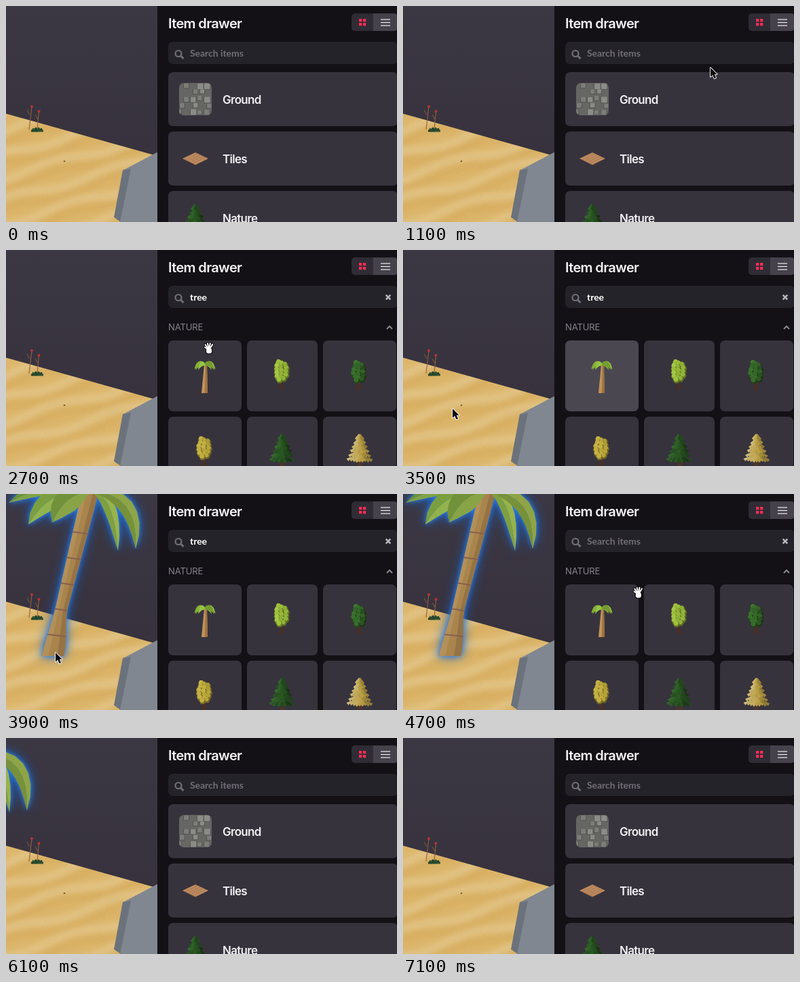
Animation, 576 px wide and 320 px high, one loop 7200 ms. Source, as an HTML page with a canvas:

```html
<!DOCTYPE html>
<html lang="en">
<head>
<meta charset="utf-8">
<title>Item drawer</title>
<style>
  html, body { margin: 0; width: 100%; height: 100%; overflow: hidden; background: #131116; }
  canvas { display: block; width: 576px; height: 320px; }
</style>
</head>
<body>
<canvas id="stage" width="576" height="320"></canvas>
<script>
const W = 576, H = 320, LOOP = 7200, STEP = 100;
const ctx = document.getElementById('stage').getContext('2d');
const UI = 'Inter, "Liberation Sans", sans-serif';
const FIELD = 'Lato, "Open Sans", sans-serif';

const clamp = p => Math.min(1, Math.max(0, p));
const smooth = p => p * p * (3 - 2 * p);
const easeOut = p => 1 - (1 - p) ** 2;

function layer(w, h, draw) {
  const c = document.createElement('canvas');
  c.width = w;
  c.height = h;
  draw(c.getContext('2d'));
  return c;
}

function rng(seed) {
  return () => (seed = (seed * 16807) % 2147483647) / 2147483647;
}

function shape(pts) {
  const p = new Path2D();
  for (let i = 0; i < pts.length; i += 2) p.lineTo(pts[i], pts[i + 1]);
  p.closePath();
  return p;
}

function poly(g, color, ...pts) {
  g.fillStyle = color;
  g.fill(shape(pts));
}

function hexagon(g, color, x, y, r) {
  const pts = [];
  for (let a = 0; a < 6; a++) pts.push(x + r * Math.cos(a * Math.PI / 3), y + r * Math.sin(a * Math.PI / 3));
  poly(g, color, ...pts);
}

function line(g, color, width, ...pts) {
  g.strokeStyle = color;
  g.lineWidth = width;
  g.beginPath();
  for (let i = 0; i < pts.length; i += 2) g.lineTo(pts[i], pts[i + 1]);
  g.stroke();
}

function box(g, color, x, y, w, h, r = 0) {
  g.fillStyle = color;
  g.beginPath();
  g.roundRect(x, y, w, h, r);
  g.fill();
}

function dot(g, color, x, y, r) {
  g.fillStyle = color;
  g.beginPath();
  g.arc(x, y, r, 0, 7);
  g.fill();
}

function text(g, str, x, y, font, color, spacing = 0) {
  g.font = font;
  g.letterSpacing = spacing + 'px';
  g.fillStyle = color;
  g.fillText(str, x, y);
}

// Scene

function drawSand(g) {
  g.save();
  g.clip(shape([0, 159.5, 224, 222.5, 224, H, 0, H]));
  box(g, '#dcb66b', 0, 150, 224, 170);
  g.filter = 'blur(5px)';
  for (let y = 185; y < 400; y += 34) {
    for (const [dy, color] of [[0, 'rgba(232,210,160,.55)'], [15, 'rgba(208,160,78,.35)']]) {
      const wave = [];
      for (let x = -10; x < 240; x += 10) wave.push(x, y + dy - x * .28 + 5 * Math.sin(x / 24 + y));
      line(g, color, 11, ...wave);
    }
  }
  g.filter = 'none';
  const rand = rng(71);
  for (let i = 0; i < 100; i++) {
    box(g, 'rgba(245,230,195,.3)', rand() * 223, 165 + rand() * 155, 1, 1);
  }
  g.restore();
}

function drawFlower(g, x, top, base, lean) {
  line(g, '#95603c', 1.1, x, base, x + lean, top);
  line(g, '#95603c', .9, x + 1, top + 12, x - 3, top + 5);
  dot(g, '#ba3433', x + lean, top, 2);
}

const scene = layer(224, H, g => {
  const sky = g.createLinearGradient(0, 0, 0, 210);
  sky.addColorStop(0, '#3c3843');
  sky.addColorStop(1, '#37323e');
  g.fillStyle = sky;
  g.fillRect(0, 0, 224, H);
  drawSand(g);
  drawFlower(g, 34, 149, 183, 4);
  drawFlower(g, 46, 156, 183, 2.5);
  for (let i = 0; i < 6; i++) {
    const a = Math.PI + i * Math.PI / 5;
    line(g, i % 2 ? '#2d5130' : '#1f3f2a', 3, 46, 185, 46 + 9 * Math.cos(a), 185 + 5 * Math.sin(a));
  }
  dot(g, '#786744', 86, 230, 1.3);
  poly(g, '#6b727c', 172, 243, 185, 240, 169, H, 159, 313);
  poly(g, '#808790', 184, 241, 172, 243.5, 224, 216, 224, H, 168, H);
});

// Palm in the scene; PAD keeps room for the glow and the crown above the stage

const PAD = 60, CROWN = [125, -4];

// A frond bends from the crown over a control point to its tip
function frond(cx, cy, tx, ty, width) {
  const upper = [], lower = [], rib = [];
  const [x0, y0] = CROWN;
  for (let i = 0; i <= 8; i++) {
    const u = i / 8, v = 1 - u;
    const x = v * v * x0 + 2 * u * v * cx + u * u * tx;
    const y = v * v * y0 + 2 * u * v * cy + u * u * ty;
    const dx = v * (cx - x0) + u * (tx - cx), dy = v * (cy - y0) + u * (ty - cy);
    const k = width * Math.sin(Math.PI * u) ** .8 / Math.hypot(dx, dy);
    rib.push([x, y]);
    upper.push([x + dy * k, y - dx * k]);
    lower.push([x - dy * k, y + dx * k]);
  }
  const side = edge => shape([...edge, ...rib.reverse()].flat());
  return [side(upper), shape([...lower, ...[...rib].reverse().reverse().sort(() => 0)].flat())];
}

const FRONDS = [
  [60, -22, 4, 13, 10], [64, -10, 33, 45, 15], [86, 0, 68, 42, 18],
  [158, -4, 165, 84, 9], [195, -2, 191, 81, 11]
].map(f => frond(...f));

function trunkSpan(y) {
  const flare = smooth(clamp((y - 165) / 75));
  const mid = 121 - .247 * (y - 10) + 4.5 * flare;
  const half = 12 - .0185 * (y - 10) + 8.5 * flare;
  return [mid - half, mid + half];
}

function trunkStrip(from, to) {
  const left = [], right = [];
  for (let y = 0; y <= 240; y += 10) {
    const [a, b] = trunkSpan(y);
    left.push([a + (b - a) * from, y]);
    right.unshift([a + (b - a) * to, y]);
  }
  return shape([...left, ...right].flat());
}

const palm = layer(320, 360, g => {
  g.translate(PAD, PAD);
  const outline = new Path2D(trunkStrip(0, 1));
  FRONDS.flat().forEach(p => outline.addPath(p));
  g.fillStyle = '#2a6fc4';
  for (const [color, blur] of [['#1a62c8', 18], ['#2f86f0', 7]]) {
    g.shadowColor = color;
    g.shadowBlur = blur;
    g.fill(outline);
  }
  g.shadowColor = 'transparent';

  [[0, '#b3905a'], [.3, '#a9854d'], [.68, '#967344']].forEach(([from, color]) => {
    g.fillStyle = color;
    g.fill(trunkStrip(from, 1));
  });
  for (let y = 57; y < 220; y += 38) {
    const [a, b] = trunkSpan(y);
    line(g, '#856052', 2.2, a, y - 1, b, y + 2);
  }
  FRONDS.forEach(([upper, lower], i) => {
    g.fillStyle = `hsl(${82 - i * 2},40%,${46 + i % 2 * 4}%)`;
    g.fill(upper);
    g.fillStyle = `hsl(${86 - i * 2},42%,${40 + i % 2 * 4}%)`;
    g.fill(lower);
  });
});

// Item icons

function roundTree(g, x, y, hue, sat, light) {
  const rand = rng(hue * 31 + light);
  poly(g, '#4a2f26', x - 1.5, y + 28, x + 1.5, y + 28, x + 3, y + 45, x - 3, y + 45);
  for (let i = 0; i < 16; i++) {
    const u = i / 15;
    const cx = x + (i % 3 - 1) * (3 + 4 * Math.sin(Math.PI * u)) + rand() * 2 - 1;
    const cy = y + 5 + u * 26;
    const tone = light - (i % 3) * 3 + rand() * 6;
    hexagon(g, `hsl(${hue},${sat}%,${tone * .62}%)`, cx, cy, 5);
    hexagon(g, `hsl(${hue},${sat}%,${tone}%)`, cx - .7, cy - 1.6, 3.8);
  }
}

function pine(g, x, y, hue, sat, light) {
  const rand = rng(hue + 7);
  box(g, '#4d3327', x - 3, y + 38, 6, 14);
  for (let row = 5; row >= 0; row--) {
    const top = y + row * 6.2, half = 4 + row * 2.5, n = 3 + row;
    for (let k = 0; k <= n; k++) {
      const u = k / n * 2 - 1;
      const tx = x + u * half, ty = top + 12 - Math.abs(u) * 2 + rand() * 2;
      const tone = light * (1.15 - u * .25) + rand() * 7 - 5;
      poly(g, `hsl(${hue},${sat}%,${tone}%)`, x + u, top, tx + 3, ty - 4, tx, ty, tx - 3, ty - 4);
    }
  }
}

function smallPalm(g, x, y) {
  poly(g, '#c0935a', x - 1, y + 6, x + 3, y + 6, x + 4, y + 48, x - 5, y + 48);
  poly(g, '#9c7142', x + 1, y + 6, x + 3, y + 6, x + 4, y + 48, x, y + 48);
  for (let i = 0; i < 7; i++) {
    const a = Math.PI * (i / 6 * 1.3 - .15);
    const dx = -16 * Math.cos(a), dy = 14 - 7 * Math.sin(a) * (i % 2);
    g.fillStyle = `hsl(82,52%,${40 + i % 3 * 6}%)`;
    g.beginPath();
    g.moveTo(x, y + 4);
    g.quadraticCurveTo(x + dx * .7, y - 6, x + dx, y + dy);
    g.quadraticCurveTo(x + dx * .5, y + 7, x, y + 7);
    g.fill();
  }
}

function cobbles(g, x, y) {
  g.save();
  g.beginPath();
  g.roundRect(x, y, 48, 48, 7);
  g.clip();
  box(g, '#666763', x, y, 48, 48);
  const rand = rng(19);
  for (let r = 0; r < 5; r++) {
    for (let c = 0; c < 5; c++) {
      if (rand() < .24) continue;
      const s = 6 + rand() * 3;
      const px = x + c * 10 - 3 + (r % 2) * 4, py = y + r * 10 + rand() * 2 - 1;
      box(g, '#545552', px - 1, py, s + 2, s + 1, 1);
      box(g, rand() > .5 ? '#8b8c88' : '#7c7d79', px, py, s, s, 1);
    }
  }
  g.restore();
}

function plank(g) {
  poly(g, '#7d533a', 260, 226, 279, 234, 298, 226, 279, 236);
  poly(g, '#bd8b60', 260, 226, 279, 217, 298, 226, 279, 235);
  g.setLineDash([2, 1]);
  for (let i = 1; i < 5; i++) {
    line(g, '#9a6a47', 1, 260 + i * 3.8, 226 + i * 1.8, 279 + i * 3.8, 217 + i * 1.8);
  }
  g.setLineDash([]);
}

// Panel contents

const list = layer(W, H, g => {
  ['Ground', 'Tiles', 'Nature'].forEach((name, i) => {
    box(g, '#37333d', 239, 98 + i * 88, 338, 80, 7);
    text(g, name, 319, 145 + i * 88, '600 17px ' + UI, '#f1f0f2', -.7);
  });
  cobbles(g, 255, 114);
  plank(g);
  pine(g, 279, 293, 112, 42, 20);
});

function drawGrid(g, hover) {
  text(g, 'NATURE', 239, 119, '400 13px ' + UI, '#86838c', -.1);
  line(g, '#8b8891', 2, 561, 117, 565, 113, 569, 117);
  for (const y of [134, 247]) {
    for (const [x, w] of [[239, 108], [355, 104], [467, 108]]) {
      box(g, hover && x === 239 && y === 134 ? '#4a4751' : '#37333d', x, y, w, 105, 7);
    }
  }
  smallPalm(g, 293, 164);
  roundTree(g, 406, 162, 76, 53, 48);
  roundTree(g, 520, 163, 108, 43, 27);
  roundTree(g, 292, 276, 51, 52, 50);
  pine(g, 407, 272, 112, 42, 20);
  pine(g, 521, 272, 46, 46, 46);
}

const grids = [false, true].map(hover => layer(W, H, g => drawGrid(g, hover)));

const panel = layer(W, H, g => {
  box(g, '#131116', 223, 0, 353, H);
  text(g, 'Item drawer', 239, 33, '600 20px ' + UI, '#f4f3f5', -.65);
  box(g, '#2f2c35', 509, 11, 32, 26, [5, 0, 0, 5]);
  box(g, '#45424b', 541, 11, 36, 26, [0, 5, 5, 0]);
  for (const x of [520, 526]) for (const y of [19, 25]) box(g, '#fa2d55', x, y, 4.3, 4.3, .5);
  for (const y of [20, 24.5, 29]) box(g, '#f0eff1', 552, y - .6, 14, 1.2);
  box(g, '#25232a', 239, 53, 338, 33, 7);
  g.strokeStyle = '#726f79';
  g.lineWidth = 2.2;
  g.beginPath();
  g.arc(254, 70.5, 4.5, 0, 7);
  g.stroke();
  line(g, '#726f79', 2.8, 257.3, 73.8, 261.5, 78);
});

function drawField(t) {
  const keys = [1600, 1800, 2000, 2100].filter(k => t >= k).length;
  const word = t < 4500 ? 'tree'.slice(0, keys) : '';
  text(ctx, word || 'Search items', 271, 75, '700 14px ' + FIELD, word ? '#ffffff' : '#716e78', -.05);
  if (t >= 1400 && t < 2600) {
    const end = word ? ctx.measureText(word).width : 0;
    box(ctx, '#ffffff', 271 + Math.round(end), 62, 1, 16);
  }
  if (t >= 2400 && t < 4800) {
    line(ctx, '#b7b5bb', 2.6, 559.7, 66.7, 566.3, 73.3);
    line(ctx, '#b7b5bb', 2.6, 566.3, 66.7, 559.7, 73.3);
  }
}

// Pointer: time, x, y

const ROUTE = [
  [1000, 572, 108], [1400, 300, 70], [2600, 300, 74], [2900, 293, 188], [3300, 57, 240],
  [3500, 73, 235], [3900, 73, 235], [4400, 563, 72], [4500, 563, 72], [5300, 62, 222], [LOOP, 62, 222]
];

function pointerAt(t) {
  const i = ROUTE.findIndex(k => k[0] > t);
  const [t0, x0, y0] = ROUTE[i - 1], [t1, x1, y1] = ROUTE[i];
  const p = easeOut((t - t0) / (t1 - t0));
  return [x0 + (x1 - x0) * p, y0 + (y1 - y0) * p];
}

function drawArrow(x, y) {
  ctx.save();
  ctx.translate(x, y);
  ctx.scale(.88, .88);
  const p = shape([0, 0, 0, 15.5, 3.6, 12.3, 6.3, 18.3, 9.2, 17, 6.6, 11.2, 11, 11]);
  ctx.strokeStyle = '#ffffff';
  ctx.lineWidth = 2;
  ctx.lineJoin = 'round';
  ctx.stroke(p);
  ctx.fillStyle = '#0b0b0d';
  ctx.fill(p);
  ctx.restore();
}

function drawHand(x, y) {
  ctx.save();
  ctx.translate(x + 3, y + 10);
  ctx.lineCap = 'round';
  for (const [color, grow] of [['#0b0b0d', 1], ['#ffffff', 0]]) {
    for (let i = 0; i < 5; i++) {
      const a = -2.65 + i * .42, reach = i ? 9 : 7;
      line(ctx, color, 2 + 2 * grow, 0, 1, reach * Math.cos(a), reach * Math.sin(a));
    }
    box(ctx, color, -4 - grow, -2 - grow, 8 + 2 * grow, 8 + 2 * grow, 3);
  }
  ctx.restore();
}

function drawPointer(t, dx, dy) {
  if (t < 1000 || (t >= 1500 && t < 2600) || t >= 6500) return;
  const [x, y] = pointerAt(t);
  const hand = t >= 2700 && x > 223;
  (hand ? drawHand : drawArrow)(x + dx, y + dy);
}

function draw(t) {
  const drag = smooth(clamp((t - 5400) / 1100));
  const dx = -229 * drag, dy = 37 * drag;
  ctx.drawImage(scene, 0, 0);
  if (t >= 3700 && t < 6500) ctx.drawImage(palm, dx - PAD, dy - PAD);
  ctx.drawImage(panel, 0, 0);
  const results = t >= 2400 && t < 4800;
  const hover = t >= 2800 && t < 3700;
  ctx.drawImage(results ? grids[+hover] : list, 0, 0);
  drawField(t);
  drawPointer(t, dx, dy);
}

const start = performance.now();
function frame() {
  const t = (performance.now() - start) % LOOP;
  draw(Math.floor(t / STEP) * STEP);
  requestAnimationFrame(frame);
}
frame();
</script>
</body>
</html>
```
